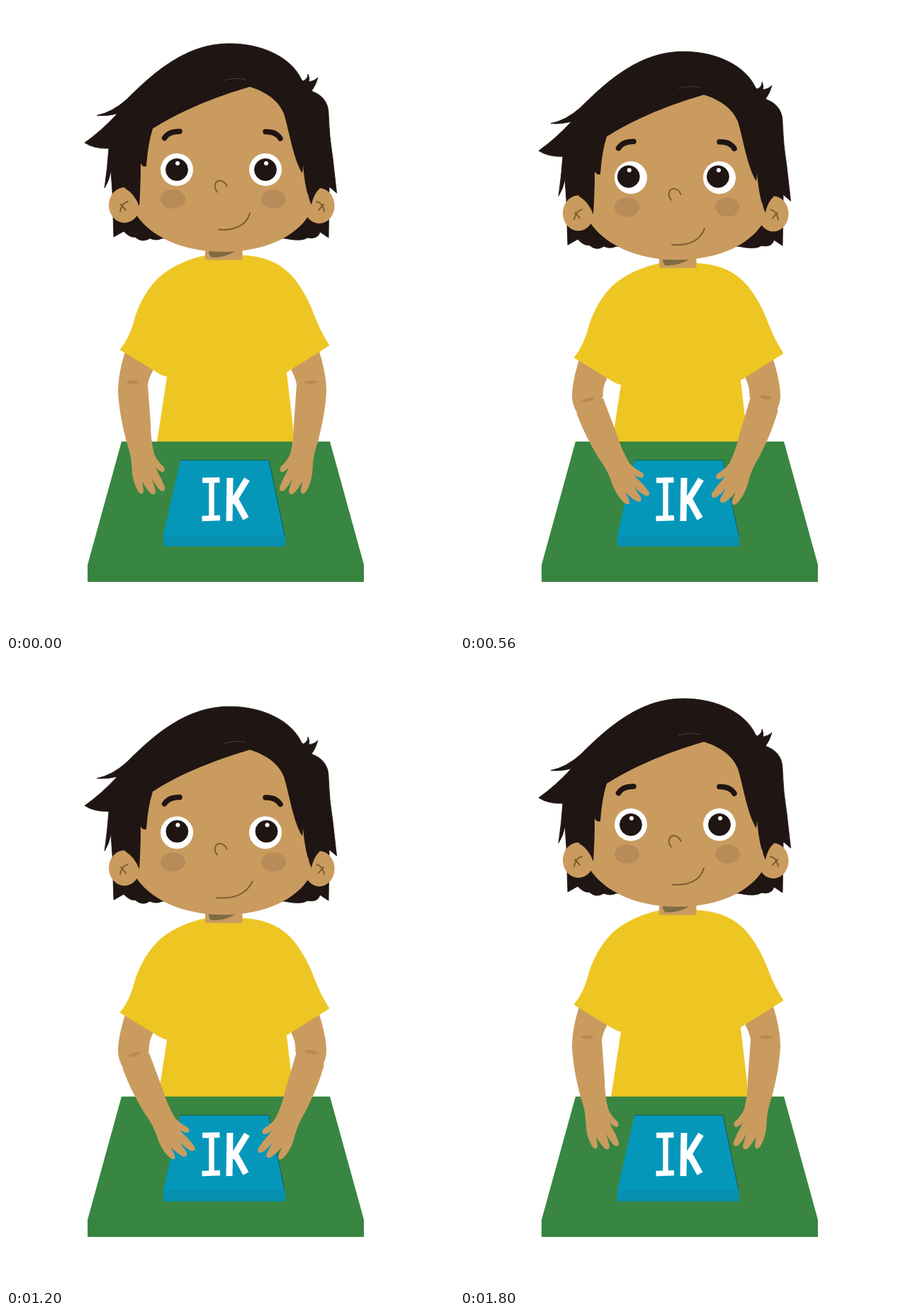
Animation, 632 px wide and 885 px high, one loop 1.84 s. Source, as an HTML page:

```html
<!DOCTYPE html>
<html lang="nl">
<head>
<meta charset="utf-8">
<title>Ik</title>
<style>
  html, body { margin: 0; width: 100%; height: 100%; overflow: hidden; background: #fff; }
  svg { display: block; width: 100%; height: 100%; }
  .skin { fill: #ca9b5f; }
  .hair { fill: #1f1512; stroke: #1f1512; stroke-width: .8; }
  .cheek { fill: #b98b58; }
  .line { fill: none; stroke: #7b5a2e; stroke-width: 1.9; stroke-linecap: round; }
  .brow { fill: none; stroke: #1f1512; stroke-width: 7.5; stroke-linecap: round; }
  .letter { fill: none; stroke: #fff; stroke-width: 9; stroke-linejoin: round; }
</style>
</head>
<body>
<svg viewBox="0 0 632 885">
  <defs>
    <g id="forearm">
      <path class="skin" d="M158 545C160 575 165 595 170 615Q176 632 177 645L178 660Q180 675 187 686
        Q194 692 194 683L192 671Q198 682 204 688Q211 692 211 684L206 667Q212 679 218 684
        Q225 687 224 679Q220 668 214 658L211 651Q217 658 221 658Q226 656 222 650Q213 642 209 632
        Q204 612 204 590L200 535L186 528L170 532Z"/>
      <path fill="#b98a50" d="M169 530Q179 526 190 531Q179 537 169 530Z"/>
    </g>
    <circle id="eye" r="23" fill="#fff"/>
    <g id="pupil">
      <circle class="hair" r="15.500"/>
      <circle cx="1" cy="-9" r="3" fill="#fff"/>
    </g>
    <path id="earline" class="line" d="M161 290Q163 278 172 276M162 280L169 288"/>
  </defs>

  <path id="upperL" class="skin"/>
  <path id="upperR" class="skin" transform="matrix(-1 0 0 1 610 0)"/>

  <path id="shirt" fill="#edc623" stroke="#edc623" stroke-width=".8" d="M161 485Q176 467 183 437
    Q194 405 215 384C235 366 262 356 283 352H333C375 354 398 370 415 397C435 428 434 445 456 479
    L395.500 517L407 615L410 640H209L213.500 615L227.500 523Q221 522 215 518Z"/>

  <path fill="#388641" d="M163 614.700H457L504.700 788V812.700H115.300V788Z"/>
  <path fill="#37843f" d="M115.300 788H504.700V812.700H115.300Z"/>
  <path fill="#0597ba" d="M246 641H371L393.500 747V762.500H222V747Z"/>
  <path fill="#078fb1" d="M222 747H393.500V762.500H222Z"/>
  <path fill="none" stroke="#20594a" d="M246 641H371L393 747"/>
  <g class="letter" role="img" aria-label="IK">
    <path d="M277 669.500L301.500 669M290 669L290 723M276.500 723.500L302 722.500" stroke-width="7.500"/>
    <path d="M316 666L315 727M340 668L319 702M321 692Q330 708 338.500 723.500"/>
  </g>

  <g id="foreL"><use href="#forearm"/></g>
  <g transform="matrix(-1 0 0 1 610 0)"><g id="foreR"><use href="#forearm"/></g></g>

  <g id="head">
    <path class="skin" d="M281 335H333.500V358.500H281Z"/>
    <path fill="#806b41" d="M286 346H324Q310 355 290 355Q286 352 286 346Z"/>
    <path class="hair" d="M128 154.500Q150 150 170 132C210 92 255 53 315 53C365 53 404 75 417 104L419 106
      Q426 103 426 96Q429 102 427 107Q435 106 440 101Q437 112 431 120C450 127 455 140 455 153
      Q456 185 461 215L466.500 264L456 255L455 327L443 319Q440 330 425 327Q418 333 393 328H220
      Q212 332 203 328Q192 335 182 326Q176 328 166 318L152 326L150 262L148 233Q146 246 139 257
      Q143 230 145 201Q125 202 111 193Q135 176 157 152Q142 156 128 154.500Z"/>
    <ellipse class="skin" cx="167" cy="281" rx="22" ry="25"/>
    <ellipse class="skin" cx="442" cy="282" rx="21.500" ry="25"/>
    <path class="hair" d="M168 257L178 225H192L189 284Q182 265 168 257ZM442 258L434 225H418L430 282Q434 264 442 258Z"/>
    <path class="skin" d="M207 173Q262 138 344 114C372 123 386 137 392 152C400 178 405 215 418 236Q419 230 419 224
      Q422 262 431 281L428 294C410 325 365 347 307 347C245 347 203 323 184 295L188 283Q190 255 190 222
      Q193 228 198 226Q200 195 207 173Z"/>
    <path fill="none" stroke="#5a483a" stroke-width=".8" d="M308 105Q325 100 339 104"/>
    <use href="#earline"/>
    <use href="#earline" transform="matrix(-1 0 0 1 610 0)"/>
    <ellipse class="cheek" cx="235.500" cy="272.500" rx="17.500" ry="13.500"/>
    <ellipse class="cheek" cx="377.500" cy="272.500" rx="17.500" ry="13.500"/>
    <use href="#eye" x="241" y="231"/>
    <use href="#eye" x="366" y="231"/>
    <use href="#pupil" id="pupilL"/>
    <use href="#pupil" id="pupilR"/>
    <path id="brows" class="brow" d="M223.500 186.500Q229 177 245 177M366 177.500Q381 177 387 187"/>
    <path class="line" d="M298 262.500C292 255 295 246.500 302 246.500Q309 247.500 311.500 254.500"/>
    <path id="mouth" class="line"/>
  </g>
</svg>
<script>
  const LOOP = 1840, STEP = 40;
  const times = [0, 360, 560, 920, 1080, 1200, 1480, 1800, 1840];
  // One value per entry in times
  const tracks = {
    lean:   [0, .52, .852, 1, 1, .84, .17, 0, 0],
    lookX:  [0, -2, -3.2, .8, .8, .4, 2.5, 0, 0],
    lookY:  [0, -1, -1.5, -2.9, -2.9, -1.7, 0, 0, 0],
    brow:   [0, 2, 3, 5, 5, 4, 2.5, 0, 0],
    mouthY: [0, 6.5, 10, 10, 10, 7.5, 3, 0, 0],
    smile:  [0, 0, 1, 6, 6, 3.5, 0, 0, 0]
  };
  const el = id => document.getElementById(id);
  const move = (id, x, y) => el(id).setAttribute('transform', `translate(${x} ${y})`);

  const slope = (v, i) => (v[i + 1] - v[i]) / (times[i + 1] - times[i]);

  function tangent(v, i) {
    if (i === 0 || i === times.length - 1) return 0;
    if (slope(v, i - 1) * slope(v, i) <= 0) return 0;
    return (v[i + 1] - v[i - 1]) / (times[i + 1] - times[i - 1]);
  }

  // Smooth curve through the keys, flat at the turning points
  function at(v, t) {
    let i = 0;
    while (t >= times[i + 1]) i++;
    const span = times[i + 1] - times[i], u = (t - times[i]) / span;
    const ease = u * u * (3 - 2 * u);
    return v[i] + (v[i + 1] - v[i]) * ease
      + span * u * (1 - u) * ((1 - u) * tangent(v, i) - u * tangent(v, i + 1));
  }

  function arm(side, k, drop, angle, x, y) {
    el('upper' + side).setAttribute('d',
      `M175 ${475 + drop}L168 ${488 + drop}Q158 ${520 + drop} 158 ${545 + 6 * k}` +
      `Q158 ${545 + 20 * k} ${158 + 8 * k} ${545 + 34 * k}L${200 + 2 * k} ${535 + 20 * k}` +
      `Q201 ${526 + drop} 207 ${515 + drop}L210 ${495 + drop}Z`);
    el('fore' + side).setAttribute('transform',
      `translate(${x * k} ${y * k}) rotate(${-angle * k} 180 540)`);
  }

  function draw(t) {
    const p = {};
    for (const name in tracks) p[name] = at(tracks[name], t);
    const k = p.lean, drop = 13.3 * k;
    move('head', 0, drop);
    move('shirt', 0, drop);
    arm('L', k, drop, 19.5, 5, 28.5);
    arm('R', k, drop, 14.5, 2, 25);
    move('pupilL', 241 + p.lookX, 231 + p.lookY);
    move('pupilR', 366 + p.lookX + 1.3 * k, 231 + p.lookY);
    move('brows', 0, p.brow);
    move('mouth', 0, p.mouthY);
    el('mouth').setAttribute('d',
      `M${300 - p.smile} 315.500C320 317.500 339 311 ${344 + p.smile} 292.500`);
  }

  function frame(now) {
    draw(Math.floor(now % LOOP / STEP) * STEP);
    requestAnimationFrame(frame);
  }
  draw(0);
  requestAnimationFrame(frame);
</script>
</body>
</html>
```
